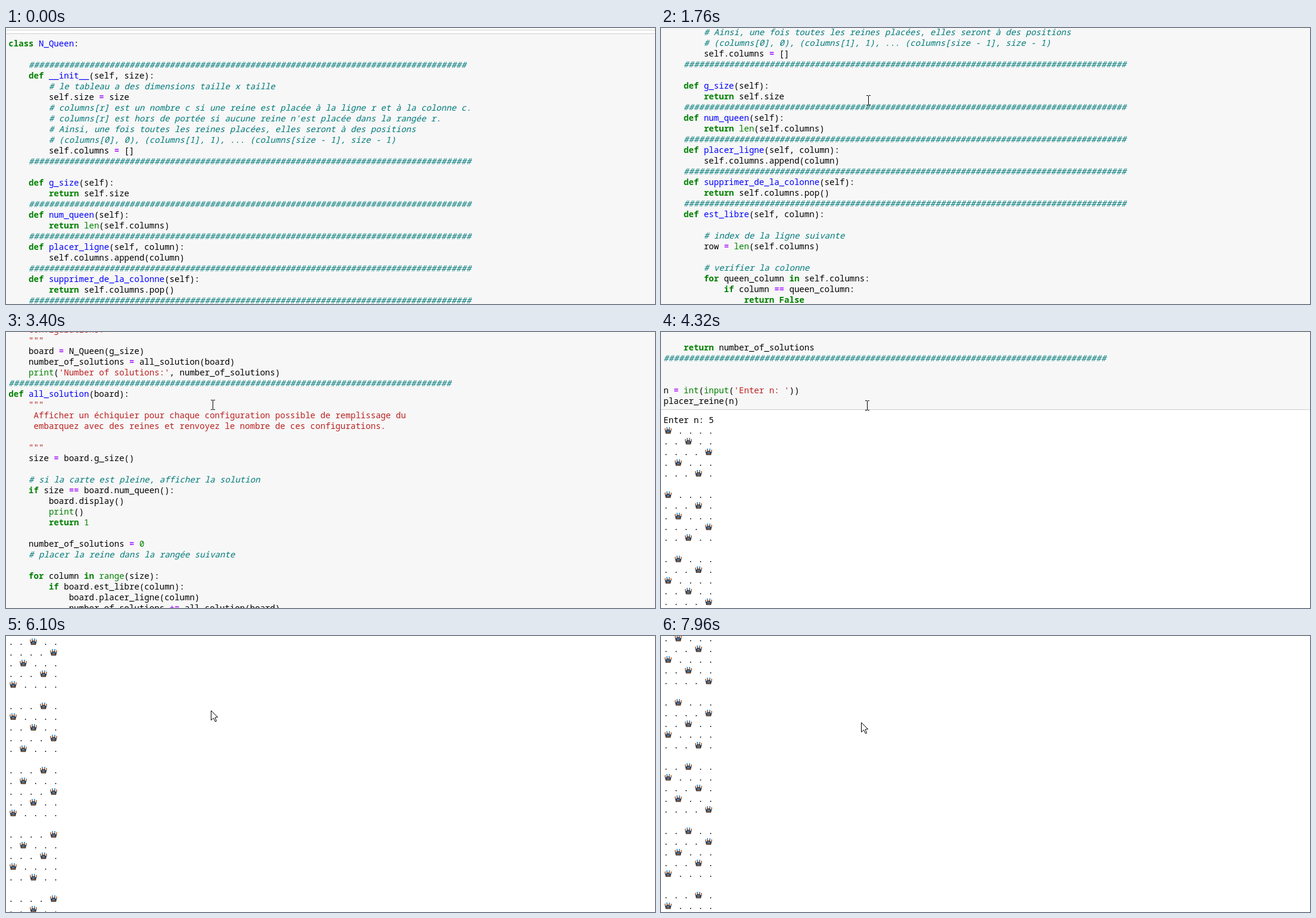
These frames come from a looping animation (1090x464 px, 8 s). An HTML page with a canvas:

```html
<!DOCTYPE html>
<html lang="fr">
<head>
<meta charset="utf-8">
<title>N_Queen</title>
<style>
html, body { margin: 0; width: 100%; height: 100%; overflow: hidden; background: #fff; }
canvas { display: block; }
</style>
</head>
<body>
<canvas width="1090" height="464"></canvas>
<script>
const ctx = document.querySelector('canvas').getContext('2d');
const WIDTH = 1090, HEIGHT = 464, LOOP = 8000;
const LEFT = 4.3, LINE = 18, CODE_BASELINE = 31, OUTPUT_BASELINE = 1791;
const CODE_TOP = 9, CODE_BOTTOM = 1768, NEXT_TOP = 2906, NEXT_BOTTOM = 2941;
const FONT = '14.08px "Noto Sans Mono", monospace';
const CROWN_WIDTH = 15.8;
const RULE = '#'.repeat(88);

const code = `class N_Queen:

    ${RULE.slice(1)}
    def __init__(self, size):
        # le tableau a des dimensions taille x taille
        self.size = size
        # columns[r] est un nombre c si une reine est placée à la ligne r et à la colonne c.
        # columns[r] est hors de portée si aucune reine n'est placée dans la rangée r.
        # Ainsi, une fois toutes les reines placées, elles seront à des positions
        # (columns[0], 0), (columns[1], 1), ... (columns[size - 1], size - 1)
        self.columns = []
    ${RULE}

    def g_size(self):
        return self.size
    ${RULE}
    def num_queen(self):
        return len(self.columns)
    ${RULE}
    def placer_ligne(self, column):
        self.columns.append(column)
    ${RULE}
    def supprimer_de_la_colonne(self):
        return self.columns.pop()
    ${RULE}
    def est_libre(self, column):

        # index de la ligne suivante
        row = len(self.columns)

        # verifier la colonne
        for queen_column in self.columns:
            if column == queen_column:
                return False

        # vérifier la diagonale
        for queen_row, queen_column in enumerate(self.columns):
            if queen_column - queen_row == column - row:
                return False

        # vérifier l'autre diagonale
        for queen_row, queen_column in enumerate(self.columns):
            if ((self.size - queen_column) - queen_row
                == (self.size - column) - row):
                return False

        return True
   ${RULE}
    def display(self):
        for row in range(self.size):
            for column in range(self.size):
                if column == self.columns[row]:
                    print('♛', end=' ')
                else:
                    print('.', end=' ')
            print()
   ${RULE}

def placer_reine(g_size):
    """
    Afficher un échiquier pour chaque configuration possible de placement de n reines
    sur un échiquier n x n où n = taille et imprimez le nombre de ces
    configurations.
    """
    board = N_Queen(g_size)
    number_of_solutions = all_solution(board)
    print('Number of solutions:', number_of_solutions)
${RULE}
def all_solution(board):
    """
     Afficher un échiquier pour chaque configuration possible de remplissage du
     embarquez avec des reines et renvoyez le nombre de ces configurations.

    """
    size = board.g_size()

    # si la carte est pleine, afficher la solution
    if size == board.num_queen():
        board.display()
        print()
        return 1

    number_of_solutions = 0
    # placer la reine dans la rangée suivante

    for column in range(size):
        if board.est_libre(column):
            board.placer_ligne(column)
            number_of_solutions += all_solution(board)
            board.supprimer_de_la_colonne()

    return number_of_solutions
${RULE}


n = int(input('Enter n: '))
placer_reine(n)`;

const STYLES = {
  plain: ['', '#000'],
  comment: ['italic ', '#007979'],
  string: ['', '#ba2121'],
  keyword: ['bold ', '#008000'],
  builtin: ['', '#008000'],
  operator: ['bold ', '#aa22ff'],
  name: ['', '#0000ff'],
};

function styleOf(token, previous) {
  if (token[0] === '#') return 'comment';
  if (token[0] === "'") return 'string';
  if (previous === 'def' || previous === 'class') return 'name';
  if (/^(class|def|return|for|in|if|else|True|False)$/.test(token)) return 'keyword';
  if (/^(len|range|enumerate|print|int|input|\d+)$/.test(token)) return 'builtin';
  return /^[-+=]+$/.test(token) ? 'operator' : 'plain';
}

let inDocstring = false;
function highlight(line) {
  const quotes = line.includes('"""');
  if (quotes || inDocstring) {
    if (quotes) inDocstring = !inDocstring;
    return [[line, 'string']];
  }
  let previous = '';
  return (line.match(/#.*|'[^']*'|\w+|[-+=]+|\s+|./g) || []).map(token => {
    const run = [token, styleOf(token, previous)];
    if (token.trim()) previous = token;
    return run;
  });
}

function solveQueens(size, columns = []) {
  if (columns.length === size) return [columns];
  const row = columns.length;
  return [...Array(size).keys()]
    .filter(c => columns.every((q, r) => q !== c && Math.abs(q - c) !== row - r))
    .flatMap(c => solveQueens(size, [...columns, c]));
}

const solutions = solveQueens(5);
const boardRows = solutions.flatMap(board => [
  ...board.map(q => board.map((_, c) => (c === q ? '♛' : '.')).join(' ')), '']);
const output = ['Enter n: 5', ...boardRows, `Number of solutions: ${solutions.length}`]
  .map(text => [[text, 'plain']]);
const codeLines = code.split('\n').map(highlight);

// start, end, steps, then the scroll offset and pointer position reached
const MOVES = [
  [70, 460, 6, 0, 580, 218],
  [610, 1380, 11, 0, 348, 121],
  [1530, 1760, 4, 163, 348, 121],
  [1930, 2490, 8, 724, 347, 122],
  [2550, 2630, 2, 818, 347, 122],
  [2780, 2940, 3, 982, 347, 122],
  [3170, 3400, 4, 1146, 347, 122],
  [3630, 3860, 4, 1392, 347, 122],
  [4090, 4320, 4, 1638, 346, 123],
  [4550, 5180, 9, 2129, 344, 125],
  [5480, 5640, 3, 2293, 344, 125],
  [6100, 6330, 4, 2456, 344, 125],
  [6480, 6870, 6, 2507, 340, 135],
  [7250, 7570, 5, 2180, 336, 145],
  [7720, 7960, 4, 2016, 336, 145],
];

function stateAt(time) {
  let state = [0, 1001, 480];
  for (const [start, end, steps, ...goal] of MOVES) {
    if (time < start) break;
    const step = Math.floor((time - start) / (end - start) * (steps - 1) + 0.01);
    const progress = Math.min(steps, step + 1) / steps;
    state = state.map((from, i) => from + (goal[i] - from) * progress);
  }
  return state.map(Math.round);
}

function box(color, x, y, w, h) {
  ctx.fillStyle = color;
  ctx.fillRect(x, y, w, h);
}

function drawCrown(x, baseline, inCode) {
  ctx.save();
  ctx.translate(Math.round(x + 2), baseline - 11);
  ctx.fillStyle = inCode ? '#8a3b3b' : '#3d3a42';
  ctx.beginPath();
  [[0, 3], [3, 6], [4, 1], [6, 5], [8, 1], [9, 6], [12, 3], [10, 11], [2, 11]]
    .forEach(([px, py]) => ctx.lineTo(px, py));
  ctx.fill();
  box('#d9782e', 0, 2, 2, 2);
  box('#4a9ad4', 3, 0, 2, 2);
  box('#4a9ad4', 7, 0, 2, 2);
  box('#d9782e', 10, 2, 2, 2);
  box('#4f83b5', 4, 6, 4, 2);
  box('#b87a3c', 3, 9, 6, 1);
  ctx.restore();
}

function drawLine(runs, y, inCode) {
  let x = LEFT;
  for (const [text, style] of runs) {
    const [variant, color] = STYLES[style];
    ctx.font = variant + FONT;
    text.split('♛').forEach((part, i) => {
      if (i) {
        drawCrown(x, y, inCode);
        x += CROWN_WIDTH;
      }
      ctx.fillStyle = color;
      ctx.fillText(part, x, y);
      x += ctx.measureText(part).width;
    });
  }
}

function drawLines(lines, firstBaseline, scroll, inCode) {
  lines.forEach((runs, i) => {
    const y = firstBaseline + i * LINE - scroll;
    if (y > -8 && y < HEIGHT + 16) drawLine(runs, y, inCode);
  });
}

function drawCell(top, bottom, scroll) {
  box('#cfcfcf', 0, top - scroll, WIDTH, bottom - top + 1);
  box('#f7f7f7', 0, top + 1 - scroll, WIDTH, bottom - top - 1);
}

function drawTextCursor(x, y) {
  box('#000', x, y - 7, 1, 15);
  for (const edge of [y - 8, y + 8]) {
    box('#000', x - 3, edge, 3, 1);
    box('#000', x + 1, edge, 3, 1);
  }
}

function drawArrow(x, y) {
  ctx.beginPath();
  [[0, 0], [0, 16], [4, 12.5], [7, 18.5], [9, 17.5], [6.5, 11.5], [11, 11]]
    .forEach(([px, py]) => ctx.lineTo(x + 0.5 + px, y + 0.5 + py));
  ctx.closePath();
  ctx.fillStyle = '#fff';
  ctx.fill();
  ctx.strokeStyle = '#000';
  ctx.lineWidth = 1;
  ctx.stroke();
}

function draw(now) {
  const [scroll, x, y] = stateAt(now % LOOP);
  box('#fff', 0, 0, WIDTH, HEIGHT);
  box('#cfcfcf', 0, 3 - scroll, WIDTH, 1);
  drawCell(CODE_TOP, CODE_BOTTOM, scroll);
  drawCell(NEXT_TOP, NEXT_BOTTOM, scroll);
  drawLines(codeLines, CODE_BASELINE, scroll, true);
  drawLines(output, OUTPUT_BASELINE, scroll, false);
  (y + scroll > CODE_BOTTOM ? drawArrow : drawTextCursor)(x, y);
}

const began = performance.now();
function tick() {
  draw(performance.now() - began);
  requestAnimationFrame(tick);
}
tick();
</script>
</body>
</html>
```
